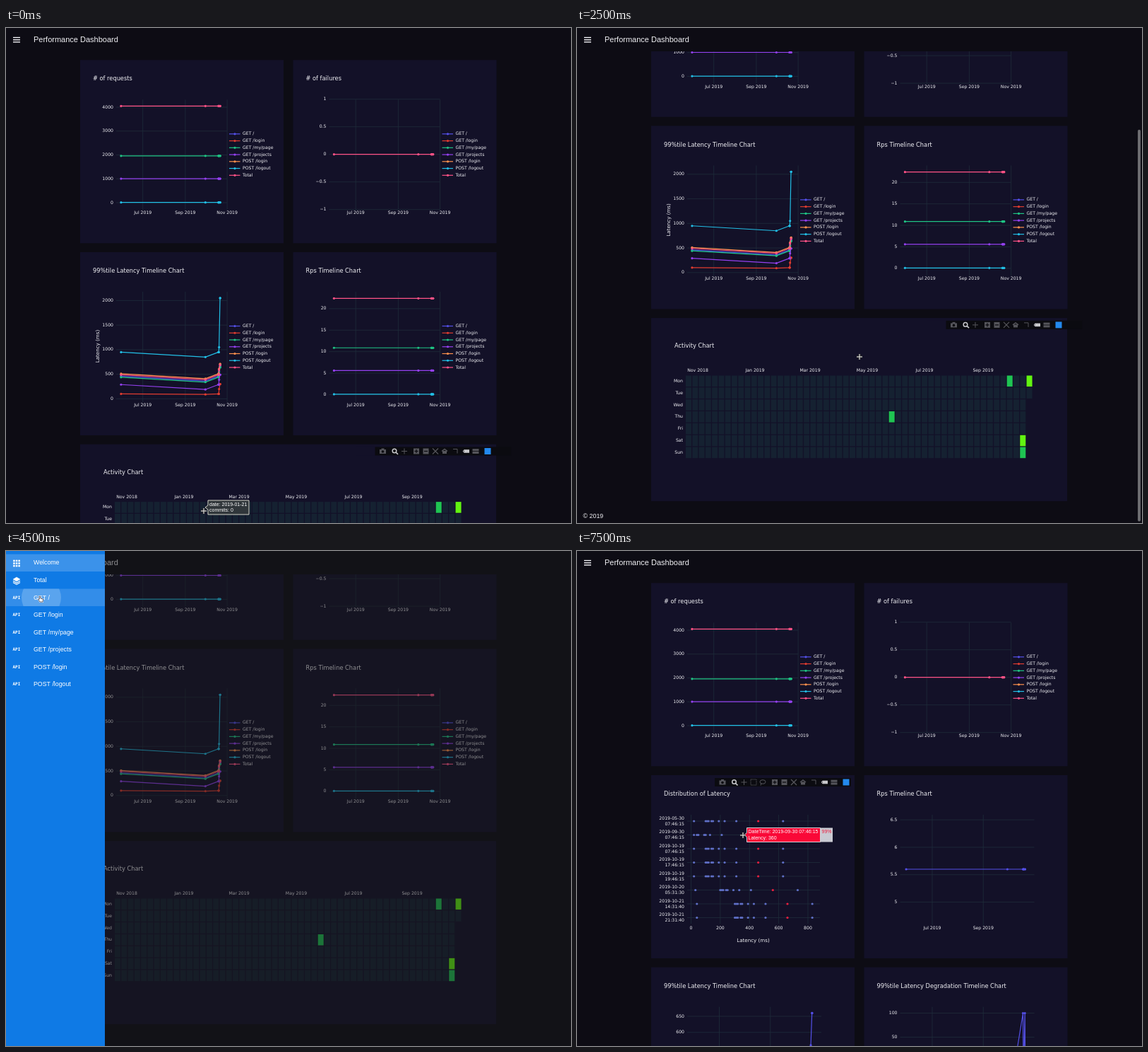
These frames come from a looping animation (800 by 700 pixels, 8000 ms). An HTML page with a canvas:

```html
<!DOCTYPE html>
<html lang="en">
<head>
<meta charset="utf-8">
<title>Performance Dashboard</title>
<style>
html, body { margin: 0; width: 100%; height: 100%; overflow: hidden; background: #0d0c14; }
canvas { display: block; }
</style>
</head>
<body>
<canvas id="stage" width="800" height="700"></canvas>
<script>
const c = document.getElementById('stage').getContext('2d');
const SANS = '"Liberation Sans", Arial, sans-serif';
const WIDE = '"DejaVu Sans", Verdana, sans-serif';
const BG = '#0d0c14', CARD = '#131128', GRID = '#1f2c3a', INK = '#f0f0f4';
const NAMES = ['GET /', 'GET /login', 'GET /my/page', 'GET /projects', 'POST /login', 'POST /logout', 'Total'];
const COLORS = ['#5450e8', '#e03c30', '#1fc484', '#9440f0', '#ff914d', '#22bfe6', '#ff5286'];
const ROW = 271.7, COL = 301.5;

// Days of the test runs, counted from 1 July 2019
const DAYS = [-31.7, 91.3, 110.3, 110.7, 110.8, 111.2, 112.6, 112.9];

function rect(x, y, w, h, fill) { c.fillStyle = fill; c.fillRect(x, y, w, h); }

function text(s, x, y, size = 6.15, { font = WIDE, align = 'left', color = INK, weight = '' } = {}) {
  c.font = `${weight} ${size}px ${font}`;
  c.textAlign = align;
  c.textBaseline = 'middle';
  c.fillStyle = color;
  c.fillText(s, x, y);
}

function poly(points, color, width = 1, close = false) {
  c.beginPath();
  points.forEach(([x, y]) => c.lineTo(x, y));
  if (close) c.closePath();
  c.strokeStyle = color;
  c.lineWidth = width;
  c.stroke();
}

function dot(x, y, r, fill) {
  c.beginPath();
  c.arc(x, y, r, 0, 7);
  c.fillStyle = fill;
  c.fill();
}

function series(points, color) {
  poly(points, color, 1.2);
  points.forEach(([x, y]) => dot(x, y, 1.6, color));
}

function card(x, y, title, w = 288, h = 259) {
  rect(x, y, w, h, CARD);
  text(title, x + 18, y + 27, 8.25);
}

function grid(x0, x1, y0, y1, xs, ys) {
  xs.forEach(x => poly([[x, y0], [x, y1]], GRID, .8));
  ys.forEach(y => poly([[x0, y], [x1, y]], GRID, .8));
}

// ticks: [label, y] pairs; jul and scale set the time axis
function timeChart(x, y, title, ticks, { jul = 88.7, scale = .971, right = 208, labels = 'Jul Sep Nov' } = {}) {
  card(x, y, title);
  const months = labels.split(' ').map((m, i) => [m + ' 2019', x + jul + scale * [0, 62, 123][i]]);
  grid(x + 51, x + right, y + 56, y + 212, months.map(m => m[1]), ticks.map(t => t[1]));
  ticks.forEach(([s, ty]) => text(s, x + 47, ty, 6.15, { align: 'right' }));
  months.forEach(([s, mx]) => text(s, mx, y + 216.5, 6.15, { align: 'center' }));
  return i => x + jul + scale * DAYS[i];
}

function flat(px, values, toY) {
  values.forEach((v, k) => v != null && series(DAYS.map((_, i) => [px(i), toY(v)]), COLORS[k]));
}

function legend(x, y) {
  NAMES.forEach((s, k) => {
    const ly = y + 104.5 + 9.75 * k;
    poly([[x + 211, ly], [x + 226.5, ly]], COLORS[k], 1.2);
    dot(x + 219, ly, 1.6, COLORS[k]);
    text(s, x + 230, ly);
  });
}

const scaleTicks = (values, toY) => values.map(v => [String(v).replace('-', '\u2212'), toY(v)]);

function topRow() {
  let toY = v => 247 - v * .03375;
  let px = timeChart(105, 45.3, '# of requests', scaleTicks([0, 1000, 2000, 3000, 4000], toY));
  flat(px, [null, null, 1960, 1005, null, 10, 4050], toY);
  legend(105, 45.3);
  toY = v => 178.7 - v * 78;
  px = timeChart(105 + COL, 45.3, '# of failures', scaleTicks([-1, -.5, 0, .5, 1], toY));
  flat(px, [null, null, null, null, null, null, 0], toY);
  legend(105 + COL, 45.3);
}

function welcomePage() {
  topRow();
  const y = 45.3 + ROW;
  let toY = v => 524.4 - v * .0695;
  let px = timeChart(105, y, '99%tile Latency Timeline Chart', scaleTicks([0, 500, 1000, 1500, 2000], toY));
  [460, 100, 440, 290, 510, 950, 490].forEach((base, k) => {
    const last = k == 5 ? 1100 : 200;
    const gain = [0, k == 1 ? -10 : -100, 0, 0, 0, 100, last, last];
    series(gain.map((g, i) => [px(i), toY(base + g)]), COLORS[k]);
  });
  legend(105, y);
  c.save();
  c.translate(130.5, 450);
  c.rotate(-Math.PI / 2);
  text('Latency (ms)', 0, 0, 7.1, { align: 'center' });
  c.restore();
  toY = v => 518.5 - v * 6.08;
  px = timeChart(105 + COL, y, 'Rps Timeline Chart', scaleTicks([0, 5, 10, 15, 20], toY));
  flat(px, [null, null, 10.9, 5.6, null, .1, 22.4], toY);
  legend(105 + COL, y);
  activity();
  text('© 2019', 8.5, 869.2, 8.9, { font: SANS });
}

function activity() {
  rect(105, 588.7, 589, 259, CARD);
  text('Activity Chart', 138, 628.5, 8.25);
  [171, 252, 330, 411, 492, 575].forEach((x, i) => {
    const month = ['Nov', 'Jan', 'Mar', 'May', 'Jul', 'Sep'][i];
    text(`${month} ${i ? 2019 : 2018}`, x, 663, 6.15, { align: 'center' });
  });
  const hits = { '49,0': '#1fc452', '52,0': '#62f511', '31,3': '#1fc452', '51,5': '#62f511', '51,6': '#1fc452' };
  'Mon Tue Wed Thu Fri Sat Sun'.split(' ').forEach((day, r) => {
    const y = 677.9 + 16.85 * r;
    text(day, 150, y, 6.15, { align: 'right' });
    for (let k = 0; k < (r < 2 ? 53 : 52); k++) {
      rect(154 + 9.28 * k, y - 7.8, 8, 15.6, hits[[k, r]] || '#152131');
    }
  });
}

function endpointPage() {
  topRow();
  const y = 45.3 + ROW;
  card(105, y, 'Distribution of Latency');
  const toX = v => 161.5 + v * .2068;
  const runs = ['05-30 07:46', '09-30 07:46', '10-19 07:46', '10-19 17:46', '10-19 19:46', '10-20 05:31', '10-21 14:31', '10-21 21:31'];
  const rowY = i => 382 + 19.5 * i, ticks = [0, 200, 400, 600, 800];
  grid(156, 344, 373, 527, ticks.map(toX), runs.map((_, i) => rowY(i)));
  ticks.forEach(v => text(v, toX(v), 533.8, 6.15, { align: 'center' }));
  text('Latency (ms)', 249.5, 550.7, 7.1, { align: 'center' });
  runs.forEach((run, i) => {
    const [day, time] = run.split(' ');
    const secs = i < 5 ? '15' : i == 5 ? '30' : '40';
    text('2019-' + day, 152, rowY(i) - 3.8, 6.15, { align: 'right' });
    text(`${time}:${secs}`, 152, rowY(i) + 4, 6.15, { align: 'right' });
    const shift = Math.min(Math.max(i - 4, 0), 2);
    const values = i == 1 ? [20, 40, 50, 90, 100, 130, 210, 360, 530]
      : [20, 100, 110, 120, 140, 150, 190, 230, 310, 460, 630].map((v, k) => v + shift * (k ? 100 : 10));
    values.forEach((v, k) => dot(toX(v), rowY(i), 1.6, k == values.length - 2 ? '#ee1f40' : '#6070c8'));
  });
  const wide = { jul: 96.5, scale: 1.165, right: 241, labels: 'Jul Sep' };
  let toY = v => 450 - (v - 5.6) * 77.6;
  let px = timeChart(105 + COL, y, 'Rps Timeline Chart', scaleTicks([5, 5.5, 6, 6.5], toY), wide);
  flat(px, [5.6], toY);
  toY = v => 658 - (v - 650) * .4536;
  px = timeChart(105, y + ROW, '99%tile Latency Timeline Chart', scaleTicks([500, 550, 600, 650], toY), wide);
  series([460, 360, 460, 460, 460, 560, 660, 660].map((v, i) => [px(i), toY(v)]), COLORS[0]);
  toY = v => 653.5 - (100 - v) * -.68;
  px = timeChart(105 + COL, y + ROW, '99%tile Latency Degradation Timeline Chart', scaleTicks([0, 50, 100], toY), wide);
  series([0, -100, 100, 0, 0, 0, 100, 0].map((v, i) => [px(i), toY(v)]), COLORS[0]);
}

function modebar(x, y, full) {
  const left = full ? x : x + 26.5;
  rect(left - 186, y - 6, 193, 12, '#0b0b10');
  if (!full) rect(x - 186, y - 6, 26, 12, CARD);
  const dim = '#55555b', lit = '#c9c9cc';
  const at = full ? d => x + d : d => x + d + 26.5;
  // camera, zoom, pan
  rect(at(-179.5), y - 2.5, 9, 6, dim);
  rect(at(-177), y - 4, 4, 2, dim);
  dot(at(-175), y + .5, 1.8, '#0b0b10');
  c.beginPath();
  c.arc(at(-158.5), y - .5, 2.8, 0, 7);
  c.lineWidth = 1.5;
  c.strokeStyle = lit;
  c.stroke();
  poly([[at(-156.5), y + 1.5], [at(-153.5), y + 4.3]], lit, 1.6);
  const pan = at(-144.5);
  poly([[pan - 4, y], [pan + 4, y]], dim, 1);
  poly([[pan, y - 4], [pan, y + 4]], dim, 1);
  if (full) {
    c.setLineDash([1.5, 1]);
    c.strokeRect(x - 135, y - 4, 8, 8);
    c.setLineDash([]);
    c.beginPath();
    c.ellipse(x - 118, y - .5, 4, 2.8, 0, 0, 7);
    c.stroke();
    poly([[x - 120, y + 1.5], [x - 121, y + 4.5]], dim);
  }
  // zoom in and out
  [-101, -87.5].forEach((d, i) => {
    rect(x + d - 4, y - 4, 8, 8, dim);
    rect(x + d - 2.5, y - .6, 5, 1.2, '#0b0b10');
    if (!i) rect(x + d - .6, y - 2.5, 1.2, 5, '#0b0b10');
  });
  poly([[x - 78, y - 4], [x - 70, y + 4]], dim, 1.2);
  poly([[x - 70, y - 4], [x - 78, y + 4]], dim, 1.2);
  poly([[x - 65, y], [x - 61, y - 3], [x - 57, y]], dim, 1.5);
  rect(x - 64, y - .5, 6, 4, dim);
  poly([[x - 49, y - 3], [x - 43, y - 3], [x - 43, y + 3]], dim, 1);
  // hover modes and the square badge
  rect(x - 33, y - 2.3, 7, 4.6, lit);
  poly([[x - 33, y - 2], [x - 34.5, y], [x - 33, y + 2]], lit, 1.2);
  rect(x - 21.5, y - 3.3, 9, 3, dim);
  rect(x - 21.5, y + .5, 9, 3, dim);
  rect(x - 4.5, y - 4.5, 9, 9, '#2389ee');
}

// Arrow goes to the left (-1) or right (1) of the box
function tip(x, y, w, lines, arrow, { fill, color, edge }) {
  const side = arrow < 0 ? x : x + w, back = arrow < 0 ? x + w : x;
  c.beginPath();
  [[back, y - 10], [side, y - 10], [side, y - 3], [side + 4 * arrow, y], [side, y + 3], [side, y + 10], [back, y + 10]]
    .forEach(p => c.lineTo(...p));
  c.closePath();
  c.fillStyle = fill;
  c.fill();
  c.strokeStyle = edge;
  c.lineWidth = 1;
  c.stroke();
  lines.forEach((s, i) => text(s, x + 2, y - 4.2 + 8.6 * i, 7, { font: SANS, color }));
}

function nameTag(s, x, y, w, color) {
  rect(x, y - 10, w, 20, '#cacad2');
  text(s, x + 2, y - 4.2, 7, { font: SANS, color });
}

const DARK_TIP = { fill: '#30363a', color: '#fff', edge: '#d2d2c6' };

function commitTip(x, y, date, n, arrow) {
  tip(x, y, 58, ['date: ' + date, 'commits: ' + n], arrow, DARK_TIP);
}

function loginTip(x, y, when, ms) {
  nameTag('POST /login', x, y, 41, COLORS[4]);
  tip(x + 41, y, 104, ['DateTime: ' + when, 'Latency: ' + ms], 1, { fill: COLORS[4], color: '#2a2018', edge: '#33302f' });
}

function percentTip() {
  nameTag('99%', 344.5, 401.5, 17.5, '#ee1f40');
  tip(240.5, 401.5, 104, ['DateTime: 2019-09-30 07:46:15', 'Latency: 360'], -1, { fill: '#fa0837', color: '#fff', edge: '#d8d0d4' });
}

function cursor(kind, x, y) {
  if (kind == 'cross') {
    [['#222', 3], ['#ddd', 1.2]].forEach(([color, w]) => {
      poly([[x - 4, y], [x + 4, y]], color, w);
      poly([[x, y - 4], [x, y + 4]], color, w);
    });
    return;
  }
  const shape = kind == 'hand'
    ? [[-2, -4], [-.5, -4], [0, -1], [3.5, 0], [3, 4], [-1, 4], [-3.5, 0], [-1.5, 0]]
    : [[-2, -4], [-2, 4], [0, 2.3], [1.2, 5], [2.3, 4.5], [1.2, 2], [3.5, 2]];
  const points = shape.map(([a, b]) => [x + a, y + b]);
  poly(points, kind == 'hand' ? '#fff' : '#ddd', 1.6, true);
  c.fillStyle = kind == 'hand' ? '#fff' : '#111';
  c.fill();
  if (kind == 'hand') poly(points, '#223', .7, true);
}

function header() {
  rect(0, 0, 800, 33, BG);
  [13.5, 16.7, 19.9].forEach(y => rect(10, y - .7, 10, 1.4, INK));
  text('Performance Dashboard', 39, 17, 11, { font: SANS });
}

function drawer(hover) {
  rect(0, 0, 800, 700, 'rgba(26,26,28,.46)');
  rect(0, 0, 140, 700, '#0f7ae5');
  rect(0, 4.5, 140, 24.5, '#3b92ea');
  if (hover) {
    rect(0, 53.5, 140, 24.5, '#338de9');
    c.save();
    c.beginPath();
    c.rect(0, 53.5, 140, 24.5);
    c.clip();
    dot(50, 66, 28, '#5aa4ee');
    c.restore();
  }
  ['Welcome', 'Total', ...NAMES.slice(0, 6)].forEach((s, i) => {
    const y = 17 + 24.55 * i;
    text(s, 39, y, 8.8, { font: SANS, color: '#fff' });
    if (i > 1) text('API', 9.5, y, 6, { font: '"DejaVu Sans Mono", monospace', color: '#fff', weight: 'bold' });
  });
  for (let i = 0; i < 9; i++) rect(10.2 + 3.6 * (i % 3), 12.6 + 3.6 * Math.floor(i / 3), 2.5, 2.5, '#fff');
  const layer = [[10, 40], [15, 37], [20, 40], [15, 43]];
  poly(layer, '#fff', .5, true);
  c.fillStyle = '#fff';
  c.fill();
  [2.2, 4.4].forEach(d => poly([[10, 40 + d], [15, 43 + d], [20, 40 + d]], '#fff', 1.2));
}

const latencyBar = () => modebar(381, 327, true);
const activityBar = () => modebar(682, 598.5, false);

// One entry per half second: pointer, scroll and what lies on top of the page
const STEPS = [
  { at: ['cross', 280, 683], over() { activityBar(); commitTip(286, 678, '2019-01-21', 0, -1); } },
  { at: ['arrow', 285, 600] },
  { at: ['cross', 283, 490], over() { latencyBar(); loginTip(132, 496, '2019-09-30 07:46:15', 410); } },
  { at: ['cross', 291, 478], over() { latencyBar(); loginTip(152.5, 475.3, '2019-10-21 14:31:40', 710); } },
  { at: ['cross', 279, 495], scroll: 147.6, bar: true, over() { latencyBar(); loginTip(132, 496, '2019-09-30 07:46:15', 410); } },
  { at: ['cross', 400, 465], scroll: 178.6, bar: true, over: activityBar },
  { at: ['cross', 560, 560], scroll: 178.6, over: activityBar },
  { at: ['cross', 633, 587], scroll: 178.6, over() { activityBar(); commitTip(566.5, 761.7, '2019-10-19', 3, 1); } },
  { at: ['hand', 16, 18], scroll: 178.6, menu: true },
  { at: ['hand', 49, 68], scroll: 178.6, menu: true, hover: true },
  { at: ['arrow', 50, 68], endpoint: true },
  { at: ['arrow', 110, 94], endpoint: true },
  { at: ['arrow', 157, 114], endpoint: true },
  { at: ['arrow', 190, 260], endpoint: true },
  { at: ['cross', 220, 385], endpoint: true, over: latencyBar },
  { at: ['cross', 235, 402], endpoint: true, over() { latencyBar(); percentTip(); } }
];

function draw(step) {
  const scroll = step.scroll || 0;
  rect(0, 0, 800, 700, BG);
  c.save();
  c.translate(0, -scroll);
  (step.endpoint ? endpointPage : welcomePage)();
  if (step.over) step.over();
  c.restore();
  header();
  if (step.bar) {
    c.beginPath();
    c.roundRect(794, 1.5 + scroll * .797, 4, 554, 2);
    c.fillStyle = '#6c6c70';
    c.fill();
  }
  if (step.menu) drawer(step.hover);
  cursor(...step.at);
}

const start = performance.now();
function tick() {
  const t = (performance.now() - start) % 8000;
  draw(STEPS[Math.floor(t / 500)]);
  requestAnimationFrame(tick);
}
tick();
</script>
</body>
</html>
```
